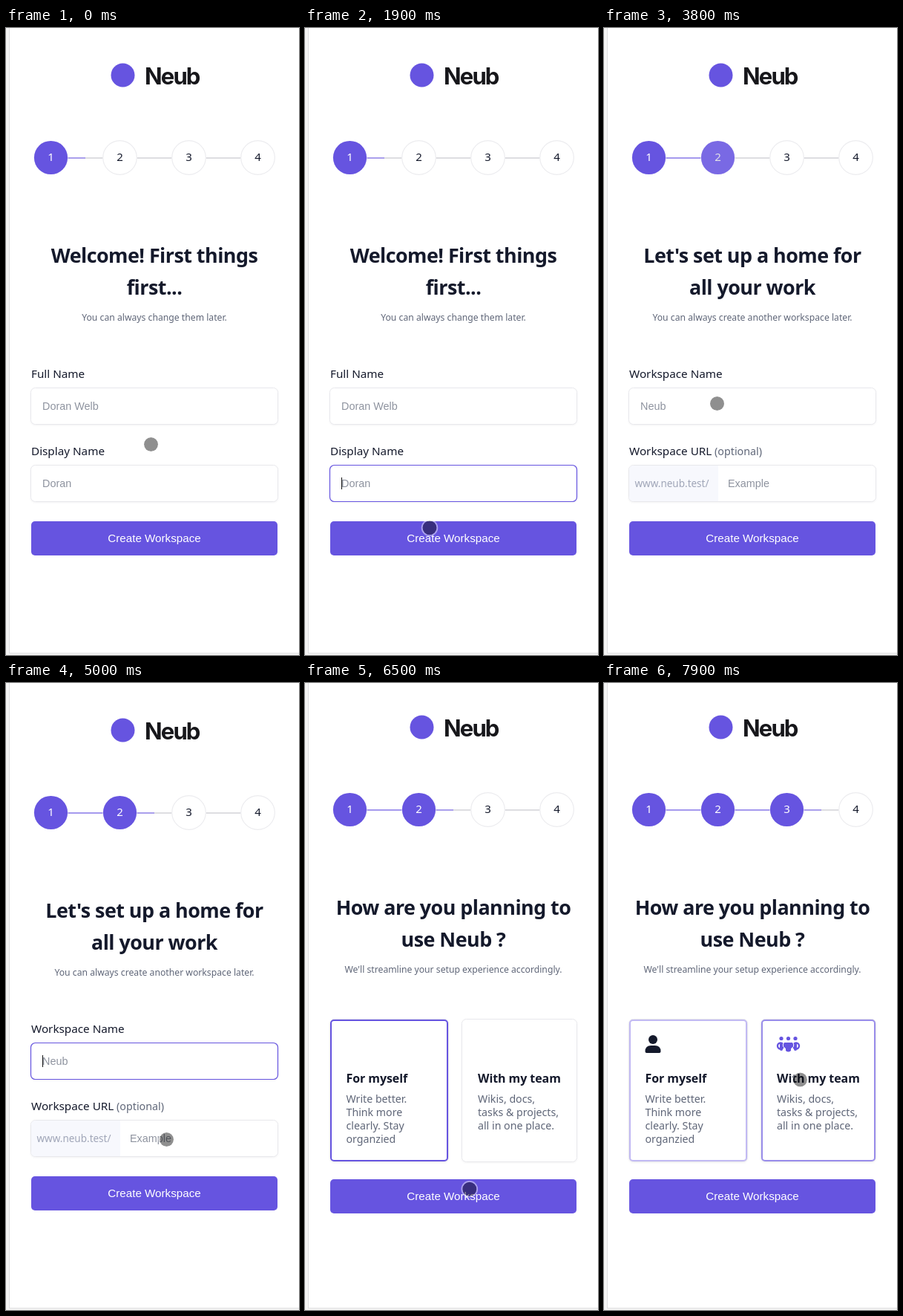
Recreate the animation shown at these times as an HTML page. Size 395x844 px, loop 8 s.

```html
<!DOCTYPE html>
<html lang="en">
<head>
<meta charset="utf-8">
<title>Workspace setup</title>
<style>
  html, body { margin: 0; width: 100%; height: 100%; overflow: hidden; background: #f4f4f4; }
  svg { display: block; width: 395px; height: 844px; }
  text { font-family: "Noto Sans", "Open Sans", sans-serif; fill: #14192b; white-space: pre; }
  .mid { text-anchor: middle; }
  .brand { font: 700 31px Inter, sans-serif; letter-spacing: -.06em; fill: #17171b; }
  .num { font-size: 15px; }
  .title { font-size: 26.9px; font-weight: 600; letter-spacing: -.02em; }
  .sub { font-size: 12.2px; fill: #5f6678; }
  .label { font-size: 15.25px; }
  .opt { font-size: 14.3px; fill: #5f6678; }
  .prefix { font-size: 13.5px; fill: #a0a6b8; }
  .hint { font: 14.4px "Liberation Sans", Arial, sans-serif; fill: #8e939f; }
  .cta { font: 15.2px "Liberation Sans", Arial, sans-serif; fill: #fff; }
  .card { font-size: 16px; font-weight: 600; letter-spacing: -.005em; }
  .body { font-size: 14.2px; fill: #5f6678; }
  .soft { fill: #fff; stroke: #e8e8ec; filter: drop-shadow(0 1px 1px rgba(20, 25, 43, .05)); }
  .focus { fill: none; stroke: #6654e0; }
</style>
</head>
<body>
<svg id="stage" viewBox="0 0 395 844" xmlns="http://www.w3.org/2000/svg"></svg>
<script>
const LOOP = 8000, STEP = 100;
const PURPLE = '#6654e0', LINE = '#dddde1', TINT = '#a599ee';
const INK = [20, 25, 43], WHITE = [255, 255, 255], VIOLET = [102, 84, 224];
const GAP = 93, LINK = 47;
const dotX = i => 60.5 + GAP * i;

// When each page and each field takes over
const pageAt = [0, 2900, 6500, LOOP];
const focusSpan = { full: [700, 1600], display: [1600, 2900], space: [4600, 5200], url: [5200, 6500] };

// Cursor moves; each eases from the previous stop
const home = { x: 195.5, y: 560.5 };
const moves = [
  { from: 0, to: 600, x: 152.5, y: 508.5 },
  { from: 800, to: 1400, x: 153, y: 623.5, bow: 10 },
  { from: 1700, to: 2230, x: 177.5, y: 704 },
  { from: 3300, to: 3800, x: 152.5, y: 505.5 },
  { from: 4600, to: 5000, x: 216.5, y: 614.5 },
  { from: 5300, to: 6200, x: 221.8, y: 681.3 },
  { from: 6900, to: 7500, x: 264.5, y: 534 }
];

const words = (cls, x, y, str, extra = '') => `<text class="${cls}" x="${x}" y="${y}" ${extra}>${str}</text>`;
const box = (x, y, w, h, r, rest) => `<rect x="${x}" y="${y}" width="${w}" height="${h}" rx="${r}" ${rest}/>`;
const disc = (x, y, r, rest = '') => `<circle cx="${x}" cy="${y}" r="${r}" ${rest}/>`;
const group = (id, ...parts) => `<g id="${id}">${parts.join('')}</g>`;

const heading = (lines, sub) =>
  lines.map((s, i) => words('title mid', 200, 316 + 43 * i, s)).join('') + words('sub mid', 200, 394, sub);

function field(id, row, label, hint, x = 49, inner = '') {
  const y = 484 + 104 * row;
  return words('label', 34, y - 13, label) +
    box(33.5, y + .5, 333, 49, 6, 'class="soft"') + inner + words('hint', x, y + 30, hint) +
    group(id, box(33.5, y + .5, 333, 49, 6, 'class="focus" stroke-width="1.2"'),
      `<path d="M49.5 ${y + 17}v16" stroke="#111"/>`);
}

function card(id, x, w, pad, title, lines, icon) {
  return box(x - .5, 452.5, w + 1, 192, 6, 'class="soft"') +
    box(x + 1, 454, w - 2, 189, 4, `id="${id}" class="focus" stroke-width="2"`) +
    group(id + 'Icon', icon) + words('card', x + pad, 538, title) +
    lines.map((s, i) => words('body', x + pad, 565 + 18 * i, s)).join('');
}

function stepper() {
  let out = '';
  for (let i = 0; i < 4; i++) {
    const x = dotX(i);
    if (i < 3) {
      out += `<path d="M${x + 23} 175h${LINK}" stroke="${LINE}" stroke-width="1.8"/>
        <path id="link${i}" stroke="${TINT}" stroke-width="1.8"/>`;
    }
    out += disc(x, 174.5, 22.8, `id="ring${i}" fill="#fff" stroke="#ececef" stroke-width="1.2"`) +
      disc(x, 174.5, 22.6, `id="dot${i}" fill="${PURPLE}"`) +
      words('num mid', x, 179.2, i + 1, `id="num${i}"`);
  }
  return out;
}

const person = disc(66, 480, 6) + '<path d="M55.5 496q0-8 8-8h5q8 0 8 8q0 2-2 2h-17q-2 0-2-2z"/>';
const team = [-1, 1].map(side => {
  const x = 248.5 + 9.5 * side;
  return disc(x, 478.5, 2.6) +
    disc(x + side, 488.5, 4, 'fill="none" stroke="currentColor" stroke-width="2.4"') +
    box(x - 2, 484, 4, 11, 2, '');
}).join('') + disc(248.5, 478.5, 2.6) +
  '<path d="M243 483.5h11q2.5 2 1.5 6l-3 2.500v3q-4 4-8 0v-3l-3-2.500q-1-4 1.500-6z" stroke="#fff"/>';

const prefix = '<path d="M154 589v48H40q-6 0-6-6v-36q0-6 6-6z" fill="#f7f8fd"/>' +
  words('prefix', 41.5, 618, 'www.neub.test/');

stage.innerHTML =
  box(4.5, -2, 400, 843.5, 0, 'fill="#fff" stroke="#dedee0"') +
  group('top', disc(157.5, 63.5, 16, `fill="${PURPLE}"`), words('brand', 187, 75.5, 'Neub'), stepper(),
    group('head0', heading(['Welcome! First things', 'first...'], 'You can always change them later.')),
    group('head1', heading(["Let's set up a home for", 'all your work'], 'You can always create another workspace later.')),
    group('head2', heading(['How are you planning to', 'use Neub ?'], "We'll streamline your setup experience accordingly."))) +
  group('page0', field('full', 0, 'Full Name', 'Doran Welb'), field('display', 1, 'Display Name', 'Doran')) +
  group('page1', field('space', 0, 'Workspace Name', 'Neub'),
    field('url', 1, 'Workspace URL', 'Example', 167, prefix), words('opt', 149, 575, '(optional)')) +
  group('page2',
    card('solo', 34, 159, 21.5, 'For myself', ['Write better.', 'Think more', 'clearly. Stay', 'organzied'], person),
    card('crew', 212, 154, 21, 'With my team', ['Wikis, docs,', 'tasks &amp; projects,', 'all in one place.'], team)) +
  group('button', box(34, 664, 332, 46, 5, `fill="${PURPLE}"`), words('cta mid', 200, 692, 'Create Workspace')) +
  group('cursor', disc(0, 0, 9.5, 'fill-opacity=".44"'),
    disc(0, 0, 10.4, 'fill="none" stroke="#fff" stroke-opacity=".45" stroke-width="1.8"')) +
  `<path id="arrow" d="M177.5 704l9.500 9.500-2 8.500-7-5.500z" fill="#2e2e38" stroke="#fff"
    stroke-width="1.2" paint-order="stroke"/>`;

const el = id => document.getElementById(id);
const show = (id, on) => el(id).style.display = on ? '' : 'none';
const within = (t, [a, b]) => t >= a && t < b;
const ramp = (t, a, b) => Math.min(1, Math.max(0, (t - a) / (b - a)));
const easeOut = k => 1 - (1 - k) ** 2;
const mix = (a, b, k) => `rgb(${a.map((v, i) => Math.round(v + (b[i] - v) * k))})`;

function cursorAt(t) {
  let { x, y } = home;
  for (const m of moves) {
    const k = easeOut(ramp(t, m.from, m.to));
    x += (m.x - x) * k + (m.bow || 0) * Math.sin(Math.PI * k);
    y += (m.y - y) * k;
  }
  return [x, y];
}

function renderSteps(t) {
  const fill = [1, ramp(t, 3450, 3850), ramp(t, 7150, 7600), 0];
  const reach = [
    .5 + .5 * ramp(t, 2900, 3450),
    .5 * ramp(t, 3800, 4300) + .5 * ramp(t, 6500, 7150),
    .5 * ramp(t, 7500, 7900)
  ];
  fill.forEach((k, i) => {
    el('dot' + i).setAttribute('opacity', k);
    el('ring' + i).setAttribute('stroke-opacity', 1 - k);
    el('num' + i).style.fill = mix(INK, WHITE, k);
  });
  reach.forEach((k, i) => el('link' + i).setAttribute('d', `M${dotX(i) + 23} 175h${LINK * k}`));
}

function renderCards(t) {
  const pick = ramp(t, 7600, 8050), tint = ramp(t, 7600, 7800);
  el('solo').setAttribute('opacity', 1 - .9 * pick);
  el('crew').setAttribute('opacity', pick);
  [['soloIcon', 1 - tint], ['crewIcon', tint]].forEach(([id, k]) => {
    el(id).style.color = el(id).style.fill = mix(INK, VIOLET, k);
    show(id, t >= 6700);
  });
}

function render(t) {
  for (let i = 0; i < 3; i++) {
    const on = within(t, pageAt.slice(i));
    show('page' + i, on);
    show('head' + i, on);
  }
  const shift = t >= pageAt[2] ? 4 : 0;
  el('top').setAttribute('transform', `translate(0 ${-shift})`);
  el('button').setAttribute('transform', `translate(0 ${shift})`);

  for (const id in focusSpan) show(id, within(t, focusSpan[id]));
  renderSteps(t);
  renderCards(t);

  const pressed = within(t, [2800, 2900]);
  show('arrow', pressed);
  show('cursor', !pressed);
  el('cursor').setAttribute('transform', `translate(${cursorAt(t)})`);
}

const start = performance.now();
function tick() {
  const t = (performance.now() - start) % LOOP;
  render(Math.floor(t / STEP) * STEP);
  requestAnimationFrame(tick);
}
tick();
</script>
</body>
</html>
```
